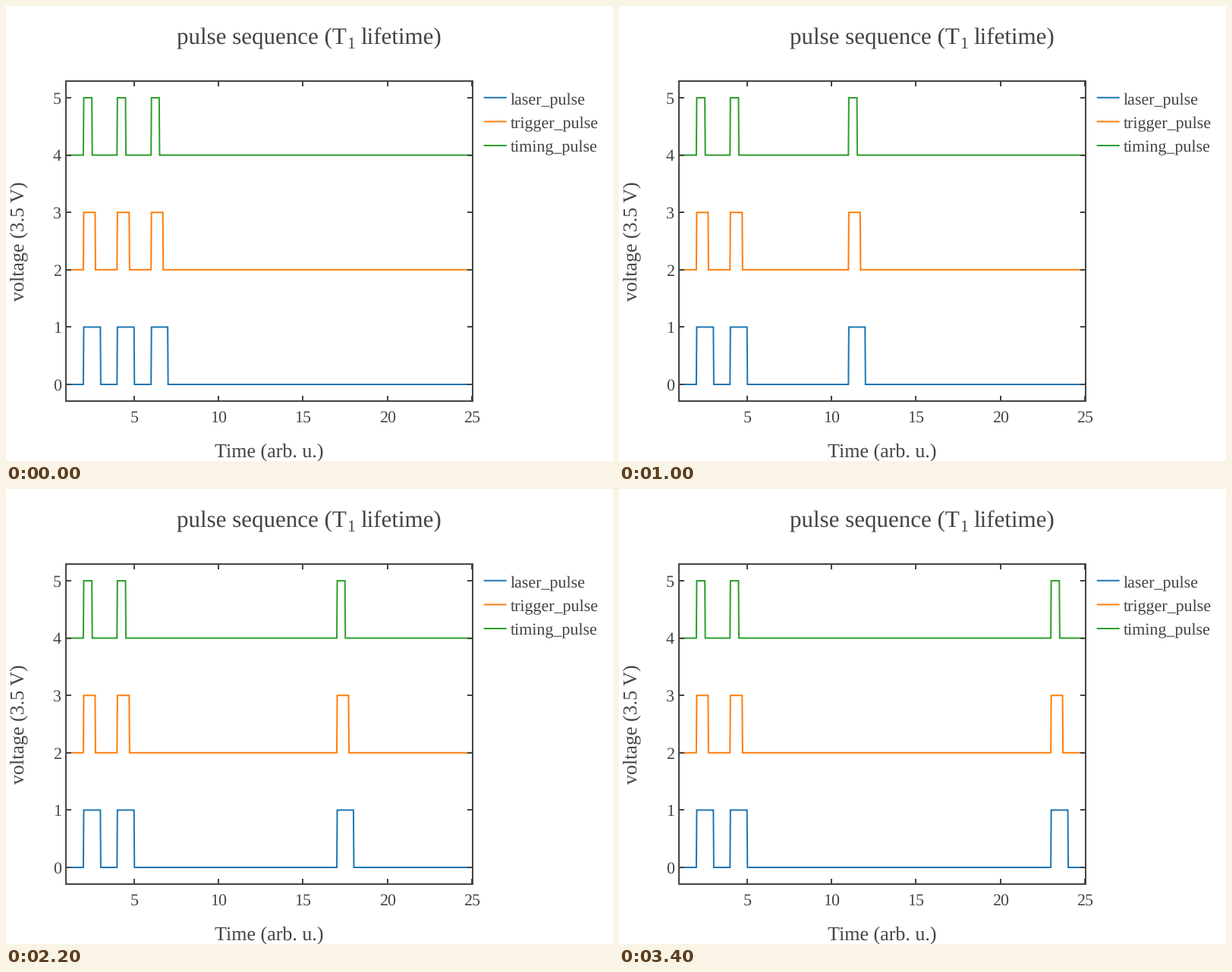
A matplotlib script for the animation above (3600 ms loop, 800 by 600 pixels).

```python
import math

import matplotlib.pyplot as plt
import numpy as np
from matplotlib.animation import FuncAnimation
from matplotlib.patches import Rectangle

W, H, DPI = 800, 600, 100
PT = 72 / DPI  # points per pixel
FRAMES, INTERVAL = 18, 200
INK = "#444444"

plt.rcParams.update({
    "font.family": "Liberation Serif",
    "text.hinting": "none",
    "path.simplify": False,
})

# Plot area in pixels, y pointing down
LEFT, RIGHT, TOP, BOTTOM = 80, 614, 100, 520
T_MIN, T_MAX = 1, 25
ZERO_Y, UNIT_Y = 499, 75.6

# name, colour, baseline level, pulse width
CHANNELS = [
    ("laser_pulse", "#1f77b4", 0, 1.0),
    ("trigger_pulse", "#ff7f0e", 2, 0.7),
    ("timing_pulse", "#2ca02c", 4, 0.5),
]
TIMES = np.linspace(T_MIN, T_MAX, 1000)
EPS = 1e-9


def px(t):
    return LEFT + (t - T_MIN) * (RIGHT - LEFT) / (T_MAX - T_MIN)


def py(v):
    return ZERO_Y - v * UNIT_Y


def crisp(p):
    return math.ceil(p - 0.5)


def pulses(starts, width, base):
    level = np.full(TIMES.shape, float(base))
    for s in starts:
        level[(TIMES > s + EPS) & (TIMES < s + width - EPS)] = base + 1
    return level


fig = plt.figure(figsize=(W / DPI, H / DPI), dpi=DPI, facecolor="white")
ax = fig.add_axes([0, 0, 1, 1])
ax.set(xlim=(0, W), ylim=(H, 0))
ax.axis("off")


def stroke(xs, ys, color, z=2, snap=False):
    line, = ax.plot(xs, ys, color=color, lw=2 * PT, zorder=z, snap=snap,
                    solid_capstyle="butt", solid_joinstyle="miter")
    return line


def label(x, y, s, size, ha="left", **kw):
    ax.text(x, y, s, fontsize=size * PT, color=INK, ha=ha, va="baseline", **kw)


def draw_axes():
    ax.add_patch(Rectangle((LEFT - 1, TOP - 1), RIGHT - LEFT + 2,
                           BOTTOM - TOP + 2, fill=False, ec=INK, lw=2 * PT,
                           joinstyle="miter", snap=True, zorder=4))
    tick = 6
    for t in range(5, 26, 5):
        x = crisp(px(t))
        stroke([x, x], [TOP, TOP + tick], INK, 3, True)
        stroke([x, x], [BOTTOM - tick, BOTTOM], INK, 3, True)
        label(px(t), 548.4, str(t), 22, "center")
    for v in range(6):
        y = crisp(py(v))
        stroke([LEFT, LEFT + tick], [y, y], INK, 3, True)
        stroke([RIGHT - tick, RIGHT], [y, y], INK, 3, True)
        label(73, py(v) + 7.7, str(v), 22, "right")


def draw_titles():
    label(225.4, 50, "pulse sequence (T", 31)
    label(449.2, 56.5, "1", 21.7)
    label(467.8, 50, "lifetime)", 31)
    label(347, 594, "Time (arb. u.)", 26, "center")
    label(23, 310, "voltage (3.5 V)", 26, "center",
          rotation=90, rotation_mode="anchor")


def draw_legend():
    for i, (name, color, _, _) in enumerate(CHANNELS):
        y = 120.8 + 31.6 * i
        stroke([629.7, 659.7], [y, y], color)
        label(664.7, y + 8.6, name, 22)


draw_axes()
draw_titles()
draw_legend()
traces = [stroke(px(TIMES), py(np.full(TIMES.shape, base)), color)
          for _, color, base, _ in CHANNELS]


def update(frame):
    starts = (2, 4, 6 + frame)
    for trace, (_, _, base, width) in zip(traces, CHANNELS):
        trace.set_ydata(py(pulses(starts, width, base)))
    return traces


anim = FuncAnimation(fig, update, frames=FRAMES, interval=INTERVAL,
                     repeat=True, repeat_delay=0, blit=False)
plt.show()
```
